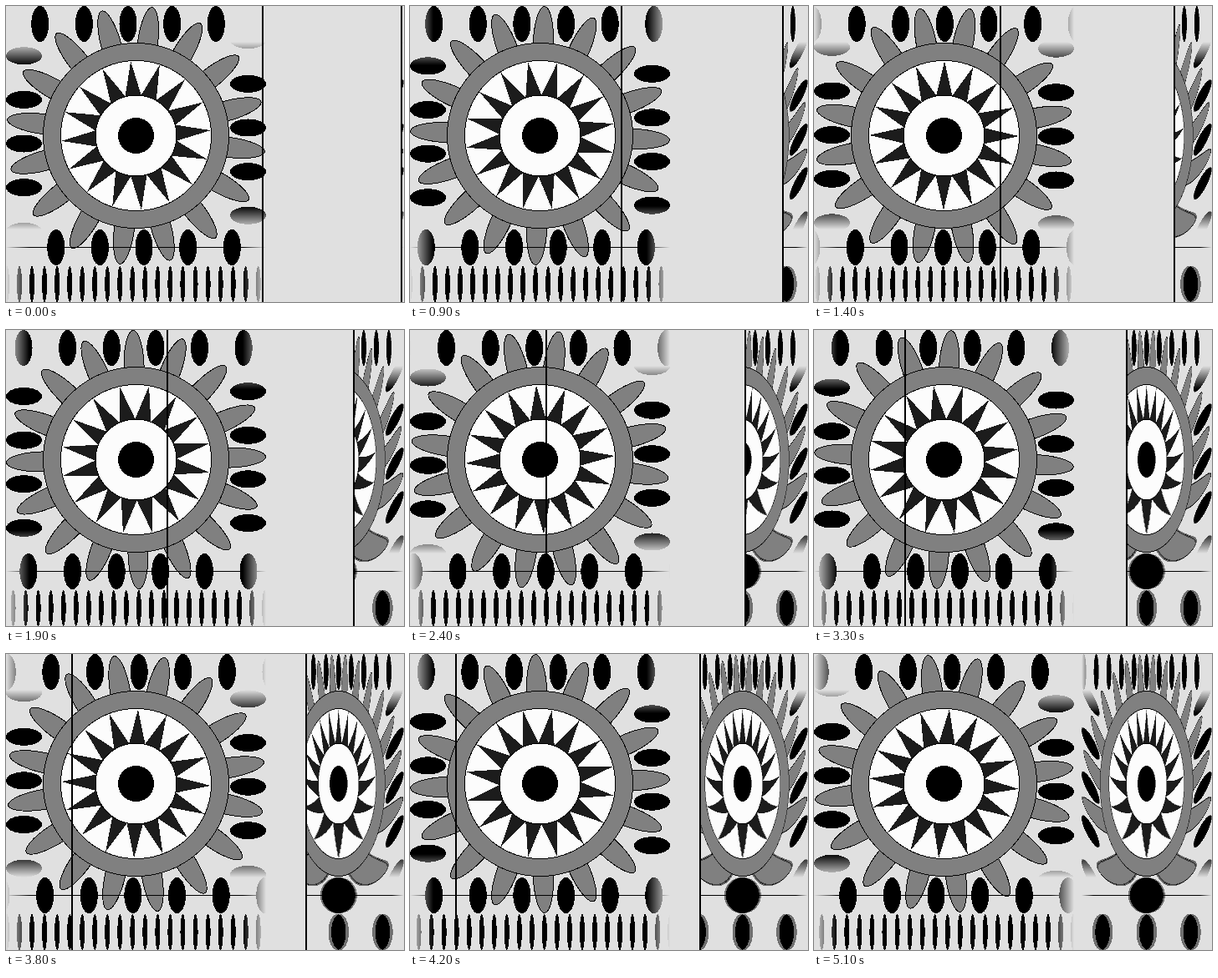
Recreate the animation shown at these times as an HTML page with a canvas. Size 476x355 px, loop 7100 ms.

```html
<!DOCTYPE html>
<html lang="en">
<head>
<meta charset="utf-8">
<title>Slit scan</title>
<style>
  html, body { margin: 0; width: 100%; height: 100%; overflow: hidden; background: #e0e0e0; }
  canvas { display: block; }
</style>
</head>
<body>
<canvas id="stage" width="476" height="355"></canvas>
<script>
const ctx = document.getElementById('stage').getContext('2d');
const W = 476, H = 355, SIZE = 311, MID = SIZE / 2, SCAN_X = 320, SCAN_W = W - SCAN_X;
const BG = 224, GREY = 128, WHITE = 252, DARK = 28;
const STEP = 100, LAST = 51, LOOP = 7100;
const TEETH = 16, TURN = 2 * Math.PI / TEETH, PITCH = 134, SPEED = 4.5, GAP = PITCH * TURN;
const HUB = 49, STAR = 89.5, RING = 111.5, SMALL = 2 / 7;
const SLOPE = HUB * Math.sin(TURN / 2) / (STAR - HUB * Math.cos(TURN / 2));

// Signed distance to the nearest multiple of a gap
const near = (v, gap) => v - gap * Math.round(v / gap);
const inOval = (u, v, rx, ry) => (u / rx) ** 2 + (v / ry) ** 2 < 1;
// Black that fades out over 28 pixels at both ends of a span
const ink = (p, lo, hi, base) =>
  base * (1 - Math.max(0, Math.min(1, (p - lo) / 28, (hi - p) / 28)));

function petal(r, a) {
  const t = near(a - TURN / 2, TURN);
  const u = r * Math.sin(t), v = r * Math.cos(t) - RING, rx = 12.5, ry = 44;
  const e = Math.hypot(u / rx, v / ry);
  if (e >= 1) return BG;
  const grad = Math.hypot(u / rx ** 2, v / ry ** 2) / e;
  return (1 - e) / grad < 1 ? 0 : GREY;
}

function wheel(cx, cy, q) {
  const r = Math.hypot(cx, cy);
  if (r > 156) return BG;
  if (r < 21.5) return 0;
  if (r < HUB - 1) return WHITE;
  if (r < HUB) return 0;
  const a = Math.atan2(cx, -cy) - q * SPEED / PITCH;
  if (r < STAR) {
    const t = Math.abs(near(a, TURN));
    return r * Math.sin(t) < (STAR - r * Math.cos(t)) * SLOPE ? DARK : WHITE;
  }
  if (r < STAR + 1) return 0;
  if (r < RING - 1) return GREY;
  return r < RING ? 0 : petal(r, a);
}

// A row of upright ovals; u runs along its direction of travel
function inRow(u, v) {
  const k = Math.round(u / GAP);
  return k <= 4 && inOval(u - k * GAP, v, 10.5, 21.5);
}

function inColumn(u, v) {
  return inOval(near(u, GAP), v, 10.5, 21.5);
}

// Grey level of one pixel; q counts steps from the slit being in the middle
function shade(px, py, q) {
  const x = px + 0.5, y = py + 0.5, cx = x - MID, cy = y - MID, d = SPEED * q;
  if (y < 43) {
    if (inRow(cx - d, y - 21.5)) return ink(x, 0, SIZE, BG);
  } else if (y < 268) {
    if (inColumn(cy + d, x - 21.5) || inColumn(cy - d, x - 289.5)) return ink(y, 43, 268, BG);
  } else if (y < 311) {
    if (inRow(-cx - d, y - 289.5)) return ink(x, 0, SIZE, BG);
  } else if (inOval(near(cx + q * 36 / 7, GAP * SMALL), y - 333.5, 10.5 * SMALL, 21.5)) {
    return ink(x, 0, SIZE, BG);
  }
  const level = wheel(cx, cy, q);
  return py === 289 ? ink(x, 0, SIZE, level) : level;
}

function paint(width, level) {
  const img = ctx.createImageData(width, H);
  for (let y = 0, i = 0; y < H; y++) {
    for (let x = 0; x < width; x++, i += 4) {
      img.data[i] = img.data[i + 1] = img.data[i + 2] = level(x, y);
      img.data[i + 3] = 255;
    }
  }
  return img;
}

// Each scan column joins two scene columns at the time the slit passes them
const scan = paint(SCAN_W, (x, y) => {
  const q = (MID - 2 * x - 1) / 6;
  return (shade(2 * x, y, q) + shade(2 * x + 1, y, q)) / 2;
});

function draw(n) {
  const q = n - LAST / 2, from = 3 * (LAST - n);
  ctx.fillStyle = `rgb(${BG}, ${BG}, ${BG})`;
  ctx.fillRect(0, 0, W, H);
  ctx.putImageData(paint(SIZE, (x, y) => shade(x, y, q)), 0, 0);
  ctx.putImageData(scan, SCAN_X, 0, from, 0, SCAN_W - from, H);
  if (n < LAST) {
    ctx.fillStyle = '#000';
    ctx.fillRect(306 - 6 * n, 0, 2, H);
    ctx.fillRect(472 - 3 * n, 0, 2, H);
  }
}

const start = performance.now();
let shown = -1;
function loop() {
  const n = Math.min(LAST, Math.floor((performance.now() - start) % LOOP / STEP));
  if (n !== shown) draw(shown = n);
  requestAnimationFrame(loop);
}
loop();
</script>
</body>
</html>
```
